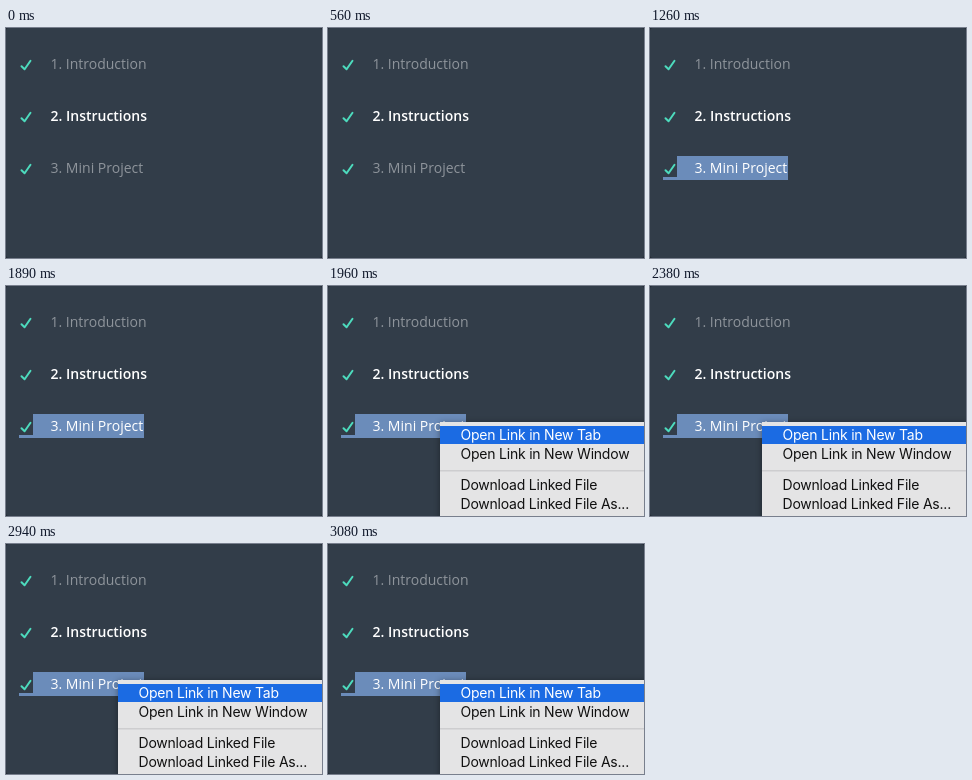
An HTML page that plays this animation: 316x230 px, repeating every 3.15 s.

```html
<!DOCTYPE html>
<html lang="en">
<head>
<meta charset="utf-8">
<title>Lesson list</title>
<style>
  html, body { margin: 0; width: 100%; height: 100%; overflow: hidden; background: #222a33; }
  svg { display: block; }
  text { white-space: pre; }
  .list { font: 14px "Open Sans", sans-serif; fill: #8e949b; }
  .list .current { font-weight: 600; fill: #fff; }
  .check { fill: none; stroke: #4ddbbd; stroke-width: 2; stroke-linecap: round; stroke-linejoin: round; }
  .menu { font: 14px Inter, sans-serif; letter-spacing: -.22px; fill: #111; }
  .panel { fill: #e4e4e5; filter: drop-shadow(0 1px 3px rgba(0, 0, 0, .4)); }
</style>
</head>
<body>
<svg width="316" height="230" viewBox="0 0 316 230">
  <defs><path id="check" class="check" d="M15.5 38.2 18.6 41.3 24.5 32.7"/></defs>
  <rect width="316" height="230" rx="3" fill="#323d49"/>
  <path id="selection" fill="#6b8cba" d="M27 128H138V152H13V149H27Z"/>
  <use href="#check"/>
  <use href="#check" y="52"/>
  <use href="#check" y="104"/>
  <g class="list">
    <text x="44.5" y="41">1. Introduction</text>
    <text x="44.5" y="93" class="current">2. Instructions</text>
    <text x="44.5" y="145" id="project">3. Mini Project</text>
  </g>
  <g id="menu" class="menu">
    <rect class="panel" x="112" y="136" width="220" height="110"/>
    <rect x="112" y="140" width="204" height="18" fill="#1b6be3"/>
    <rect x="112" y="184" width="204" height="1.5" fill="#cdcdcf"/>
    <text x="132.5" y="154" fill="#fff">Open Link in New Tab</text>
    <text x="132.5" y="173">Open Link in New Window</text>
    <text x="132.5" y="204">Download Linked File</text>
    <text x="132.5" y="223">Download Linked File As...</text>
  </g>
</svg>
<script>
  const LOOP = 3150, HOVER = 770, SELECT = 1260, MENU = 1960;
  const byId = id => document.getElementById(id);
  const project = byId("project"), selection = byId("selection"), menu = byId("menu");
  const show = (el, on) => el.setAttribute("visibility", on ? "visible" : "hidden");

  function draw(now) {
    const t = now % LOOP;
    project.style.fill = t >= HOVER ? "#fff" : "";
    show(selection, t >= SELECT);
    show(menu, t >= MENU);
  }

  const start = performance.now();
  function tick() {
    draw(performance.now() - start);
    requestAnimationFrame(tick);
  }
  tick();
</script>
</body>
</html>
```
